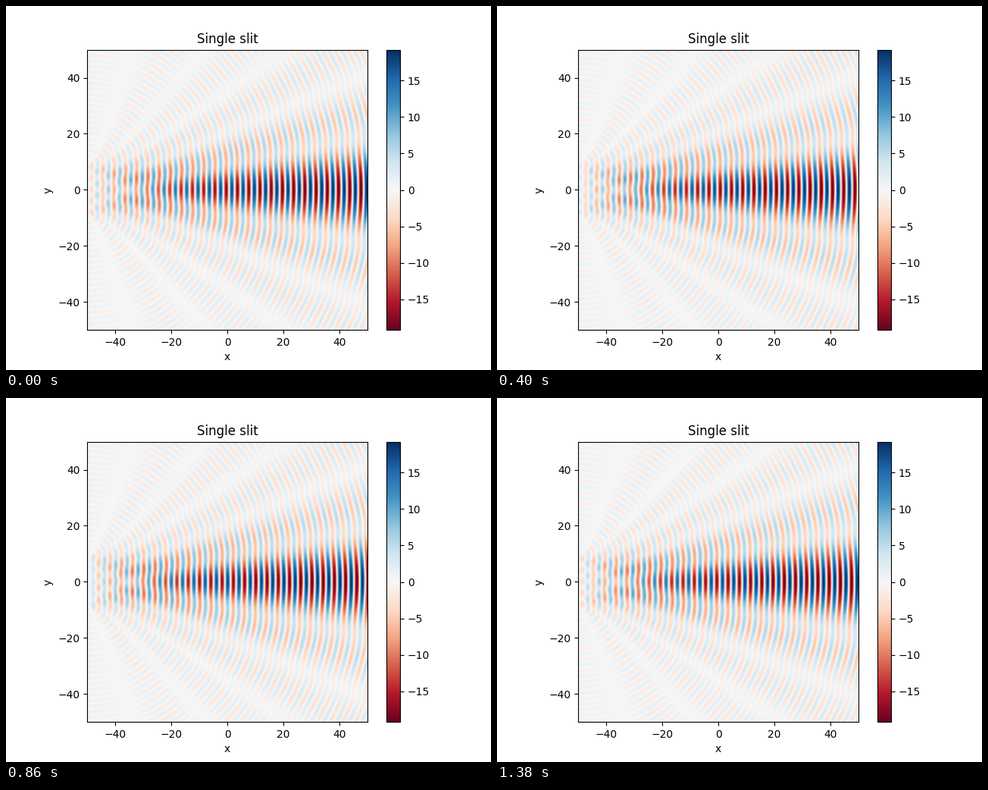
A matplotlib script for the animation above (1.48 s loop, 640 by 480 pixels).

```python
import numpy as np
import matplotlib.pyplot as plt
from matplotlib.animation import FuncAnimation

HALF = 50            # half width of the field
WAVELENGTH = 4
STEPS = 30           # phase steps per wave period
TICK = 20            # ms

# Point sources spread evenly over the slit on the left edge.
slit = np.linspace(-10, 10, 20)
axis = np.linspace(-HALF, HALF, 400)
x, y = np.meshgrid(axis, axis)
k = 2 * np.pi / WAVELENGTH
wave = sum(np.exp(1j * k * np.hypot(x + HALF, y - s)) for s in slit)

# Every third step is held longer, and so is the last one.
holds = [5 if i % 3 == 1 or i == STEPS - 1 else 1 for i in range(STEPS)]
timeline = np.repeat(np.arange(STEPS), holds)


def field(step):
    return (wave * np.exp(-2j * np.pi * step / STEPS)).real


fig, ax = plt.subplots(figsize=(6.4, 4.8), dpi=100)
image = ax.imshow(field(0), cmap="RdBu", origin="lower",
                  extent=(-HALF, HALF, -HALF, HALF))
fig.colorbar(image, ax=ax)
ax.set(title="Single slit", xlabel="x", ylabel="y")


def update(tick):
    image.set_data(field(timeline[tick]))
    return [image]


anim = FuncAnimation(fig, update, frames=len(timeline), interval=TICK,
                     repeat=True, repeat_delay=0, blit=False)
plt.show()
```
